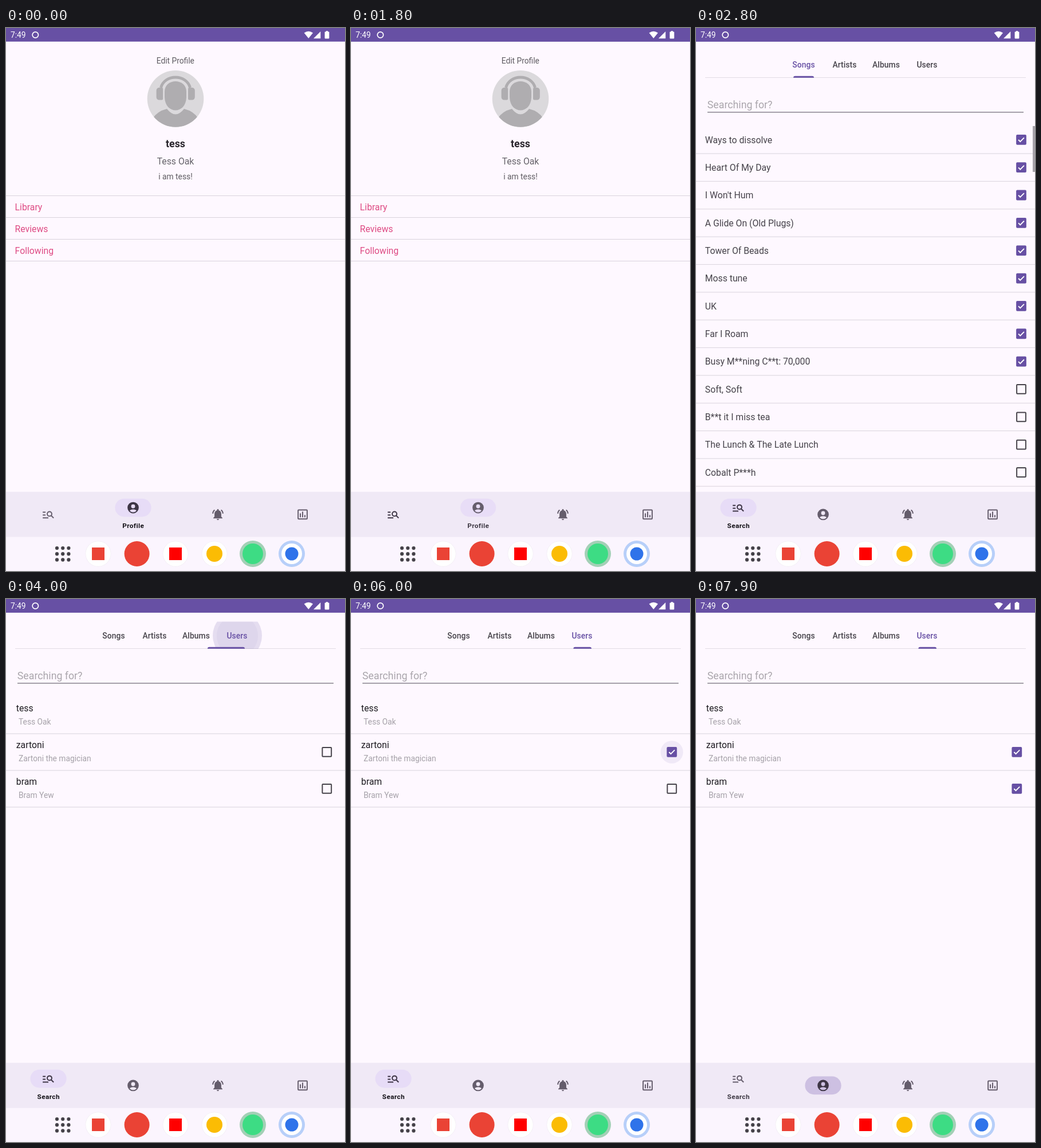
Write an HTML page with a canvas that moves like this. It is 592 px wide and 947 px high and loops after 8000 ms.

```html
<!DOCTYPE html>
<html lang="en">
<head>
<meta charset="utf-8">
<title>Music profile and search</title>
<style>
html, body { margin: 0; width: 100%; height: 100%; overflow: hidden; background: #fef8ff; }
canvas { display: block; width: 592px; height: 947px; }
</style>
</head>
<body>
<canvas id="stage"></canvas>
<script>
const W = 592, H = 947, LOOP = 8000, STEP = 100;
const DP = W / 600;
const canvas = document.getElementById('stage');
const ctx = canvas.getContext('2d');
const ratio = window.devicePixelRatio || 1;
canvas.width = W * ratio;
canvas.height = H * ratio;

const BG = '#fef8ff', BAR = '#f0e9f6', PRIMARY = '#6750a4', PILL = '#e7dcf7';
const INK = '#46434a', DARK = '#3d3545', MUTED = '#655d6c', LINE = '#dcd7df';

const SONGS = ['Ways to dissolve', 'Heart Of My Day', 'I Won\'t Hum', 'A Glide On (Old Plugs)',
  'Tower Of Beads', 'Moss tune', 'UK', 'Far I Roam', 'Busy M**ning C**t: 70,000', 'Soft, Soft',
  'B**t it I miss tea', 'The Lunch & The Late Lunch', 'Cobalt P***h'];
const CHECKED_SONGS = 9;
const USERS = [
  { name: 'tess', full: 'Tess Oak' },
  { name: 'zartoni', full: 'Zartoni the magician', press: 5750 },
  { name: 'bram', full: 'Bram Yew', press: 6750 }
];
const TABS = [['Songs', 188], ['Artists', 259.5], ['Albums', 332], ['Users', 403.5]];
const NAV_X = [74, 222, 370, 518];
const NAV_LABELS = ['Search', 'Profile'];
const NAV_REST = 848.4, NAV_RAISED = 836.6;

// Timeline in ms
const TO_SEARCH = 1780, SLIDE = 2350, TAB_PRESS = 3700, TAB_CLICK = 3813, TO_PROFILE = 7700;

const clamp = v => Math.max(0, Math.min(1, v));
const span = (t, start, length) => clamp((t - start) / length);
const lerp = (a, b, k) => a + (b - a) * k;
const cubic = (a, b, c, d, s) => {
  const r = 1 - s;
  return a * r * r * r + 3 * b * r * r * s + 3 * c * r * s * s + d * s * s * s;
};
function curve(xs, ys, x) {
  let lo = 0, hi = 1;
  for (let i = 0; i < 24; i++) {
    const mid = (lo + hi) / 2;
    if (cubic(...xs, mid) < x) lo = mid; else hi = mid;
  }
  return cubic(...ys, lo);
}
const standard = x => curve([0, 0.4, 0.2, 1], [0, 0, 1, 1], x);
const slideEase = x => x < 1 / 6
  ? curve([0, 0.05, 0.1333, 1 / 6], [0, 0, 0.06, 0.4], x)
  : curve([1 / 6, 0.2083, 0.25, 1], [0.4, 0.82, 1, 1], x);

function text(str, x, y, sp, color, weight = 400, align = 'left', spacing = 0) {
  ctx.font = `${weight} ${sp * DP}px Roboto, sans-serif`;
  ctx.letterSpacing = spacing + 'px';
  ctx.textAlign = align;
  ctx.fillStyle = color;
  ctx.fillText(str, x, y);
}
function rect(x, y, w, h, color) {
  ctx.fillStyle = color;
  ctx.fillRect(x, y, w, h);
}
function round(x, y, w, h, r, color) {
  ctx.fillStyle = color;
  ctx.beginPath();
  ctx.roundRect(x, y, w, h, r);
  ctx.fill();
}
function disc(x, y, r, color) {
  ctx.fillStyle = color;
  ctx.beginPath();
  ctx.arc(x, y, r, 0, Math.PI * 2);
  ctx.fill();
}
function poly(points, color) {
  ctx.fillStyle = color;
  ctx.beginPath();
  points.forEach(p => ctx.lineTo(...p));
  ctx.fill();
}
function stroke(points, color, width) {
  ctx.strokeStyle = color;
  ctx.lineWidth = width;
  ctx.beginPath();
  points.forEach(p => ctx.lineTo(...p));
  ctx.stroke();
}
function faded(alpha, draw) {
  if (alpha <= 0) return;
  ctx.save();
  ctx.globalAlpha *= alpha;
  draw();
  ctx.restore();
}

// Icons on a 24 unit grid
const PERSON = new Path2D('M12 2a10 10 0 1 0 0 20a10 10 0 1 0 0-20z' +
  'M12 6a3.5 3.5 0 1 1 0 7a3.5 3.5 0 1 1 0-7z' +
  'M12 20c-2 0-4.4-.8-6.1-2.9C7.5 15.8 9.7 15 12 15s4.5.8 6.1 2.1C16.4 19.2 14 20 12 20z');
const BELL = new Path2D('M18 11c0-3.1-1.6-5.6-4.5-6.3V4a1.5 1.5 0 0 0-3 0v.7C7.6 5.4 6 7.9 6 11v5l-2 2v1h16v-1l-2-2z' +
  'M10 20h4a2 2 0 0 1-4 0z');
const ICONS = [
  c => {
    rect(2, 7, 5, 2, c);
    rect(2, 12, 5, 2, c);
    rect(2, 17, 10, 2, c);
    ctx.strokeStyle = c;
    ctx.lineWidth = 2;
    ctx.beginPath();
    ctx.arc(14, 11, 4, 0, Math.PI * 2);
    ctx.stroke();
    stroke([[16.6, 13.6], [21.3, 18.3]], c, 2);
  },
  c => {
    ctx.fillStyle = c;
    ctx.fill(PERSON, 'evenodd');
  },
  c => {
    ctx.fillStyle = c;
    ctx.fill(BELL);
    ctx.strokeStyle = c;
    ctx.lineWidth = 2;
    for (const [a, b] of [[Math.PI * 1.02, Math.PI * 1.28], [-Math.PI * 0.28, -Math.PI * 0.02]]) {
      ctx.beginPath();
      ctx.arc(12, 11, 9, a, b);
      ctx.stroke();
    }
  },
  c => {
    ctx.strokeStyle = c;
    ctx.lineWidth = 2;
    ctx.beginPath();
    ctx.roundRect(4, 4, 16, 16, 1);
    ctx.stroke();
    rect(7, 10, 2, 7, c);
    rect(11, 7, 2, 10, c);
    rect(15, 13, 2, 4, c);
  }
];
function icon(i, x, y, color) {
  ctx.save();
  ctx.translate(x, y);
  ctx.scale(DP, DP);
  ctx.translate(-12, -12);
  ICONS[i](color);
  ctx.restore();
}

function checkbox(x, y, on) {
  ctx.save();
  ctx.translate(x, y - 0.2);
  ctx.scale(DP, DP);
  if (on) {
    round(-9, -9, 18, 18, 2, PRIMARY);
    stroke([[-5, 0.2], [-1.8, 3.5], [5, -3.4]], '#fff', 1.9);
  } else {
    ctx.strokeStyle = INK;
    ctx.lineWidth = 2;
    ctx.beginPath();
    ctx.roundRect(-8, -8, 16, 16, 1);
    ctx.stroke();
  }
  ctx.restore();
}

function statusBar() {
  rect(0, 0, W, 23.7, PRIMARY);
  text('7:49', 8, 17.3, 14, '#fff');
  ctx.strokeStyle = '#fff';
  ctx.lineWidth = 1.7;
  ctx.beginPath();
  ctx.arc(51.3, 12, 5.2, 0, Math.PI * 2);
  ctx.stroke();
  ctx.fillStyle = '#fff';
  ctx.beginPath();
  ctx.moveTo(528.3, 18);
  ctx.lineTo(520.6, 8.6);
  ctx.quadraticCurveTo(528.3, 2.8, 536, 8.6);
  ctx.fill();
  poly([[537, 18.2], [549.3, 18.2], [549.3, 6]], '#fff');
  round(556.6, 6.6, 7.8, 12, 1, '#fff');
  rect(558.8, 5.2, 3.4, 2, '#fff');
}

function taskbar() {
  rect(0, 887.8, W, H - 887.8, '#fbf5fe');
  for (let i = 0; i < 9; i++) {
    disc(89 + (i % 3) * 10.2, 907 + Math.floor(i / 3) * 10.2, 3.1, '#454249');
  }
  for (const x of [161, 296, 364]) {
    disc(x, 917, 22.4, '#f0ebf2');
    disc(x, 917, 21.8, '#fff');
  }
  round(150, 906, 22, 22, 0, '#ea4335');
  disc(228.6, 917, 22, '#ea4335');
  round(285, 906, 22, 22, 0, '#ff0000');
  disc(364, 917, 14, '#fbbc04');
  disc(431, 917, 23, '#a3d0b6');
  disc(431, 917, 18, '#3ddc84');
  disc(499, 917, 23, '#b7cff9');
  disc(499, 917, 18, '#fff');
  disc(499, 917, 11.5, '#2f73ea');
}

function pill(x, y, scale, tint = 0) {
  const w = 63.2 * scale;
  round(x - w / 2, y - 15.8, w, 31.6, 15.8, PILL);
  faded(tint, () => round(x - w / 2, y - 15.8, w, 31.6, 15.8, '#5a4682'));
}

// u is the time since the tap on the item "to"; negative while nothing was tapped
function navBar(from, to, u, dx) {
  rect(0, 808.9, W, 78.9, BAR);
  ctx.save();
  ctx.translate(dx, 0);
  const tapped = u >= 0;
  const move = standard(span(u, 220, 115));
  const leave = span(u, 0, 150);
  const enter = standard(span(u, 60, 120));
  const rise = NAV_X.map(() => NAV_REST);
  rise[from] = lerp(NAV_RAISED, NAV_REST, move);
  if (tapped) rise[to] = lerp(NAV_REST, NAV_RAISED, move);
  faded(1 - leave, () => pill(NAV_X[from], rise[from], 1 - leave * 0.12));
  faded(enter, () => pill(NAV_X[to], rise[to], lerp(0.4, 1, enter), 0.18 * (1 - span(u, 260, 150))));
  NAV_X.forEach((x, i) => icon(i, x, rise[i], i === (tapped ? to : from) ? DARK : MUTED));
  const label = (i, color) => text(NAV_LABELS[i], NAV_X[i] + 0.2, 872.2, 12, color, 700, 'center', 0.4);
  faded(1 - move, () => label(from, tapped ? '#3f3a45' : '#141218'));
  faded(move, () => label(to, '#141218'));
  ctx.restore();
}

function avatar() {
  const tone = '#afadb0', pale = '#dbd9dc';
  ctx.save();
  ctx.beginPath();
  ctx.arc(296, 123.4, 49.3, 0, Math.PI * 2);
  ctx.clip();
  rect(246, 73, 100, 101, pale);
  ctx.fillStyle = tone;
  ctx.beginPath();
  ctx.moveTo(256, 158);
  ctx.quadraticCurveTo(264, 145, 281, 141);
  ctx.quadraticCurveTo(296, 160, 311, 141);
  ctx.quadraticCurveTo(328, 145, 336, 158);
  ctx.lineTo(336, 176);
  ctx.lineTo(256, 176);
  ctx.fill();
  ctx.beginPath();
  ctx.moveTo(277, 111);
  ctx.bezierCurveTo(277, 87, 315, 87, 315, 111);
  ctx.lineTo(315, 121);
  ctx.bezierCurveTo(314, 151, 278, 151, 277, 121);
  ctx.fill();
  ctx.strokeStyle = tone;
  ctx.lineWidth = 5;
  ctx.beginPath();
  ctx.moveTo(270.5, 104);
  ctx.bezierCurveTo(277, 80, 315, 80, 321.5, 104);
  ctx.stroke();
  round(262.6, 104, 11.5, 21.6, [5, 2, 2, 5], tone);
  round(318, 104, 11.8, 21.6, [2, 5, 5, 2], tone);
  ctx.restore();
}

function profilePage(t, dx) {
  rect(0, 23.7, W, 864, BG);
  for (let i = 0; i < 4; i++) rect(0, 292 + i * 38, W, 1, '#d9d3dc');
  ctx.save();
  ctx.translate(dx, 0);
  text('Edit Profile', 295.8, 62.3, 14, '#5f5c62', 400, 'center');
  avatar();
  text('tess', 296, 207.8, 18, '#28252b', 700, 'center');
  text('Tess Oak', 296, 237.6, 16, '#66636a', 400, 'center');
  text('i am tess!', 296, 264.4, 14, '#5f5c62', 400, 'center');
  ['Library', 'Reviews', 'Following'].forEach((s, i) => text(s, 15.6, 317.8 + i * 38, 16, '#de4b84'));
  ctx.restore();
  navBar(1, 0, t - TO_SEARCH, dx);
}

function tabRipple(t) {
  const alpha = 1 - span(t, 4020, 300);
  if (t < TAB_PRESS || alpha <= 0) return;
  const r = lerp(12, 43, standard(span(t, TAB_PRESS, 225)));
  ctx.save();
  ctx.beginPath();
  ctx.rect(340, 39.5, 130, 47.4);
  ctx.clip();
  faded(0.16 * alpha, () => disc(404, 64, r, PRIMARY));
  faded(0.05 * alpha, () => disc(404, 64, r * 0.84, PRIMARY));
  ctx.restore();
}

function tabs(t) {
  rect(16, 86, 560, 1, '#e2dce5');
  tabRipple(t);
  const active = t >= TAB_CLICK ? 3 : 0;
  TABS.forEach(([s, x], i) => text(s, x, 68.8, 14, i === active ? PRIMARY : INK, 500, 'center', 0.1));
  // The leading edge decelerates while the trailing edge accelerates
  const k = standard(span(t, TAB_CLICK, 300)) * Math.PI / 2;
  const left = lerp(170, 388.3, 1 - Math.cos(k));
  const right = lerp(206, 420, Math.sin(k));
  round(left, 83.8, right - left, 3, [3, 3, 0, 0], PRIMARY);
}

function songList(t, dx) {
  SONGS.forEach((s, i) => {
    const y = 195 + i * 48.35;
    text(s, 15.8, y + 5.6, 16, INK);
    checkbox(568, y, i < CHECKED_SONGS);
    rect(-dx, y + 23.5, W, 1.1, LINE);
  });
  faded(1 - span(t, 3620, 250), () => rect(588, 171, 4, 80, '#a7a3aa'));
}

function userList(t) {
  USERS.forEach((u, i) => {
    const y = 203 + i * 64;
    text(u.name, 17.8, y - 7, 16, '#1d1b20');
    text(u.full, 22, y + 16, 14, '#a5a1a8');
    rect(0, y + 31.4, W, 1.1, LINE);
    if (!u.press) return;
    if (t >= u.press) {
      const r = lerp(6, 19.7, standard(span(t, u.press, 225)));
      faded(0.09 * (1 - span(t, u.press + 300, 200)), () => disc(560.3, y, r, PRIMARY));
    }
    checkbox(560.3, y, t >= u.press + 100);
  });
}

function searchPage(t, dx) {
  rect(0, 23.7, W, 864, BG);
  ctx.save();
  ctx.translate(dx, 0);
  tabs(t);
  text('Searching for?', 19.8, 139.6, 18, '#aaa6ac');
  rect(20, 146.3, 552, 1.2, '#6d6972');
  if (t < 3900) songList(t, dx); else userList(t);
  ctx.restore();
  navBar(0, 1, t - TO_PROFILE, dx);
}

function draw(t) {
  ctx.setTransform(ratio, 0, 0, ratio, 0, 0);
  const k = slideEase(span(t, SLIDE, 450));
  if (t < SLIDE + 90) profilePage(t, -W * 0.1 * k);
  else searchPage(t, W * 0.1 * (1 - k));
  statusBar();
  taskbar();
}

function tick(now) {
  draw(Math.floor((now % LOOP) / STEP) * STEP);
  requestAnimationFrame(tick);
}
requestAnimationFrame(tick);
</script>
</body>
</html>
```
